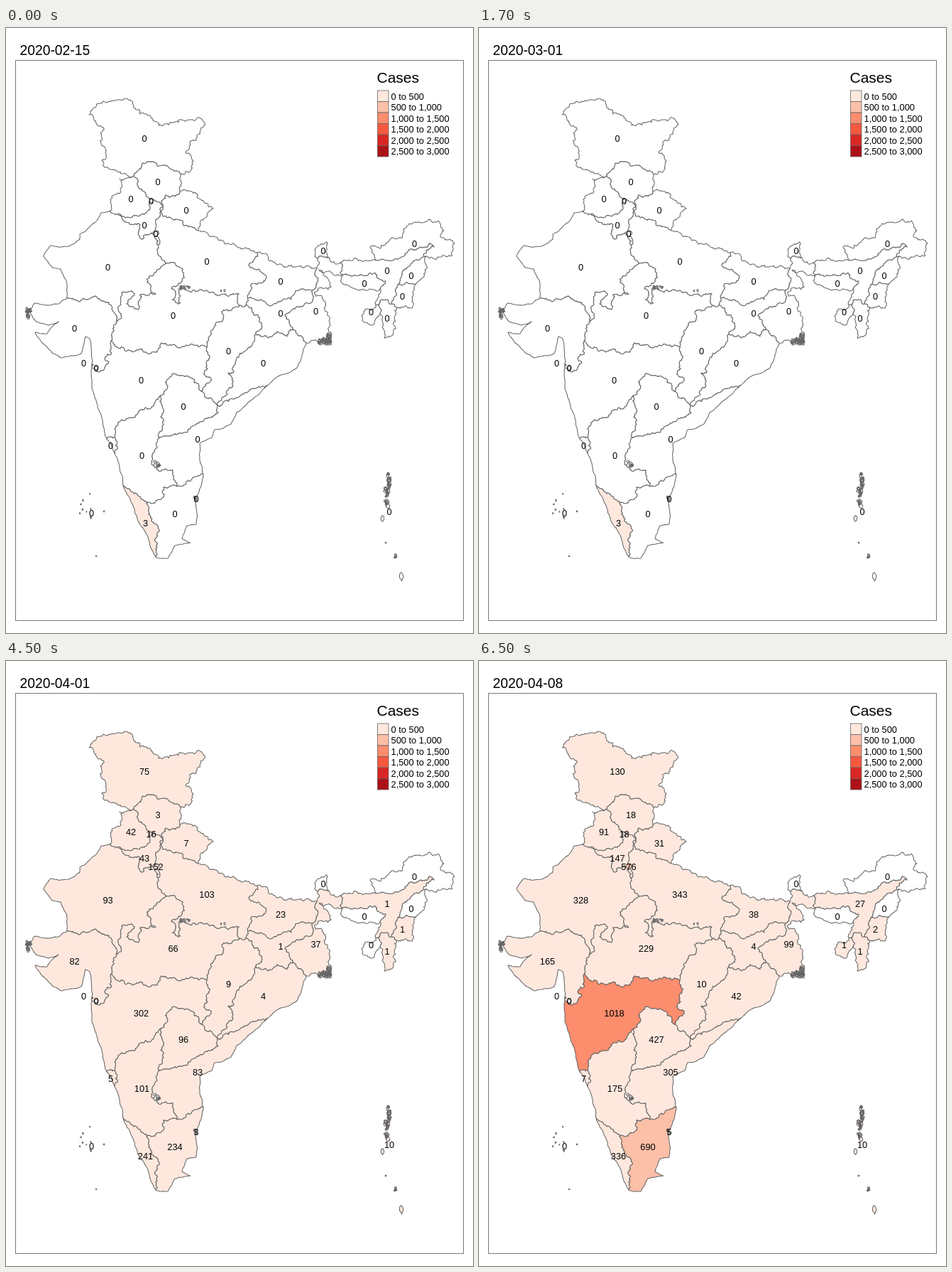
These frames come from a looping animation (658x851 px, 8000 ms). An HTML page:

```html
<!DOCTYPE html>
<html lang="en">
<head>
<meta charset="utf-8">
<title>Cases by state</title>
<style>
html, body { margin: 0; width: 100%; height: 100%; overflow: hidden; background: #fff; }
svg { display: block; width: 658px; height: 851px; font-family: "Liberation Sans", Arial, sans-serif; }
</style>
</head>
<body>
<svg id="stage" viewBox="0 0 658 851"></svg>
<script>
const stage = document.getElementById("stage");
const LINE = "#666";
const SHADES = ["#fee8de", "#fcbfa8", "#fc8d6d", "#f7593f", "#da2723", "#ac1117"];
const STEPS = [[0, "2020-02-15"], [500, "2020-03-01"], [2500, "2020-03-15"], [4500, "2020-04-01"], [6500, "2020-04-08"]];
const LOOP = 8000;

function add(tag, attrs) {
  const el = document.createElementNS("http://www.w3.org/2000/svg", tag);
  for (const k in attrs) el.setAttribute(k, attrs[k]);
  return stage.appendChild(el);
}
function label(x, y, size, text, anchor = "start") {
  const el = add("text", { x, y, "font-size": size, "text-anchor": anchor });
  el.textContent = text;
  return el;
}
const drawLine = (d, width = 1.05) =>
  add("path", { d, fill: "#fff", stroke: LINE, "stroke-width": width, "stroke-linejoin": "round" });

function random(seed) {
  return () => {
    seed = (seed + 0x6d2b79f5) | 0;
    let v = Math.imul(seed ^ (seed >>> 15), 1 | seed);
    v = (v + Math.imul(v ^ (v >>> 7), 61 | v)) ^ v;
    return ((v ^ (v >>> 14)) >>> 0) / 4294967296;
  };
}
const trace = pts => "M" + pts.map(p => p.map(v => v.toFixed(1)).join(" ")).join("L");
const gap = (a, b) => Math.hypot(a[0] - b[0], a[1] - b[1]);

// Splits each step at a shifted midpoint, again and again, for a ragged line.
function roughen(pts, amp) {
  const rnd = random(pts[0][0] * 977 + pts[0][1] * 31 + pts.length);
  const split = (a, b) => {
    const d = gap(a, b);
    if (d < 2.8) return [b];
    const k = (rnd() - 0.5) * 2 * Math.min(amp, 3 / d);
    const m = [(a[0] + b[0]) / 2 - (b[1] - a[1]) * k, (a[1] + b[1]) / 2 + (b[0] - a[0]) * k];
    return [...split(a, m), ...split(m, b)];
  };
  return pts.reduce((out, p, i) => i ? out.concat(split(pts[i - 1], p)) : [p], []);
}

// Key points of shared borders; "~" marks a smooth one.
const BORDERS = {
  jkOut: "180 208 155 200 141 196 135 186 141 181 134 163 133 148 138 143 117 122 126 112 158 101 175 101 189 121 204 124 215 137 243 133 244 129 277 130 268 158 259 160 253 175 264 187 261 200 246 206",
  jkHp: "180 208 193 190 205 188 213 194 226 193 246 206",
  hpOut: "246 206 247 219 245 231",
  hpUk: "245 231 225 235 221 250",
  hpHar: "221 250 205 243",
  punHp: "180 208 188 226 205 243",
  punOut: "180 208 160 212 163 224 147 241 145 258",
  punRaj: "145 258 158 262",
  punHar: "158 262 178 266 199 258 205 243",
  ukOut: "245 231 253 228 272 240 292 254 271 285",
  ukUp: "221 250 221 265 240 269 258 279 271 285",
  harUp: "221 250 211 272 214 305",
  harRaj: "158 262 177 276 186 275 193 297 205 288 214 305",
  rajOut: "~145 258 134 260 127 272 104 290 104 297 88 307 63 306 53 321 65 337 77 339 85 355 86 380",
  rajUp: "214 305 217 321 232 330",
  rajGuj: "86 380 127 378 146 389 155 413",
  rajMp: "155 413 162 409 163 373 181 374 170 388 186 396 189 375 211 374 199 358 202 349 232 330",
  upMp: "232 330 249 339 250 347 233 367 239 371 234 382 246 387 245 365 285 371 328 374 328 392",
  upCh: "328 392 341 391",
  upJh: "341 391 341 380",
  upBih: "341 380 345 363 362 358 367 349 343 331 354 316",
  upOut: "271 285 305 299 333 311 354 316",
  bihOut: "354 316 385 332 438 338",
  bihWb: "438 338 437 350 432 369",
  bihJh: "341 380 370 390 402 382 413 369 432 369",
  jhCh: "341 391 355 404 361 420 352 430",
  jhOd: "352 430 375 434 382 427 396 434 405 424",
  jhWb: "405 424 393 405 417 392 432 383 432 369",
  wbOd: "405 424 423 443",
  wbOut: "423 443 438 440 458 446 457 418 453 402 446 381 436 377 440 366 458 364 441 340 474 347",
  wbAs: "474 347 471 330",
  wbNep: "438 338 439 325",
  wbSik: "439 325 455 323",
  wbBhu: "455 323 471 330",
  sikOut: "439 325 438 308 452 301 455 323",
  asBhu: "471 330 521 327",
  arOut: "521 327 513 308 526 310 559 290 567 277 609 271 617 285 612 293 632 303 629 320 592 321",
  asAr: "521 327 556 323 596 303 603 308 583 325",
  arNa: "583 325 592 321",
  naOut: "592 321 590 340 577 360",
  asNa: "583 325 565 337 552 361",
  naMn: "552 361 577 360",
  mnOut: "577 360 572 394 550 393",
  asMn: "552 361 543 388",
  mnMz: "543 388 550 393",
  asMz: "526 388 531 382 543 388",
  mzOut: "550 393 545 432 533 436 527 402",
  mzTr: "526 388 527 402",
  trAs: "521 389 526 388",
  trOut: "527 402 514 418 502 407 504 399 518 395 521 389",
  asMe: "474 347 518 345 535 356 527 367",
  meOut: "474 347 475 360 510 369 527 367",
  asBd: "527 367 521 389",
  gujOut: "~86 380 74 388 40 387 34 400 42 413 60 418 74 413 58 430 41 428 56 447 78 464 106 458 112 434 118 437 122 468 121 478",
  gujMp: "155 413 149 439",
  gujMh: "149 439 148 459 140 463 145 470 133 482 121 478",
  mpMh: "149 439 156 449 178 456 213 456 219 443 283 449",
  mpCh: "283 449 285 436 306 408 304 399 328 392",
  mhCh: "283 449 280 488 289 494 275 511",
  mhTe: "275 511 263 493 236 486 218 517",
  mhKa: "218 517 203 536 190 537 181 548 155 560 153 576",
  mhGoa: "142 578 153 576",
  mhOut: "~121 478 120 488 128 528 142 578",
  goaOut: "~142 578 153 598",
  goaKa: "153 576 153 598",
  chOd: "352 430 344 449 328 463 320 485 313 485 318 506 298 531",
  chTe: "275 511 298 531",
  teAp: "298 531 299 541 255 569 217 576",
  teKa: "218 517 218 547 217 576",
  odAp: "298 531 337 513 368 503",
  odOut: "~423 443 417 460 410 478 380 492 368 503",
  apOut: "~368 503 325 541 317 557 294 565 290 576 273 584 278 628",
  apTn: "278 628 241 645",
  apKa: "217 576 206 600 209 617 235 622 241 645",
  kaTn: "241 645 222 646 222 660 198 669",
  kaKe: "165 643 180 655 198 669",
  kaOut: "~153 598 165 643",
  keOut: "~165 643 187 695 211 744",
  keTn: "198 669 201 684 214 700 211 744",
  tnOut: "~278 628 267 668 268 698 255 700 248 718 260 724 238 728 228 746 211 744"
};
const lines = {};
for (const name in BORDERS) {
  const pairs = BORDERS[name].match(/\d+ \d+/g).map(p => p.split(" ").map(Number));
  lines[name] = roughen(pairs, BORDERS[name][0] === "~" ? 0.08 : 0.32);
}

function ring(names) {
  return trace(names.split(" ").reduce((out, name) => {
    const next = lines[name], end = out[out.length - 1];
    if (!end) return next;
    return out.concat(gap(end, next[0]) < 1 ? next : [...next].reverse());
  }, [])) + "Z";
}
function blob(x, y, rx, ry) {
  const rnd = random(x * 53 + y);
  return trace(Array.from({ length: 9 }, (_, i) => {
    const a = i / 9 * Math.PI * 2, r = 0.7 + rnd() * 0.5;
    return [x + Math.cos(a) * rx * r, y + Math.sin(a) * ry * r];
  })) + "Z";
}
// Scatters n small islets of about the given size over a box.
function islets(x, y, w, h, n, size) {
  const rnd = random(x + y);
  return Array.from({ length: n }, () =>
    blob(x + rnd() * w, y + rnd() * h, size * (0.5 + rnd()), size * (0.7 + rnd() * 1.5))).join("");
}

// Label place, counts in time order, outline.
const states = [];
function state(place, counts, outline) {
  const [x, y] = place.split(" ").map(Number);
  const d = outline[0] === "M" ? outline : ring(outline);
  states.push({ x, y, counts: counts.split(" ").map(Number), shape: drawLine(d) });
}
add("rect", { width: 658, height: 851, fill: "#fff" });
state("195 155.5", "0 5 75 130", "jkOut jkHp");
state("214 216", "0 0 3 18", "jkHp hpOut hpUk hpHar punHp");
state("176 240.5", "0 1 42 91", "punOut punRaj punHar punHp");
state("254 256", "0 1 7 31", "ukOut ukUp hpUk");
state("195 277", "0 14 43 147", "hpHar punHar harRaj harUp");
state("143.5 336", "0 4 93 328", "rajOut rajGuj rajMp rajUp harRaj punRaj");
state("283 328", "0 13 103 343", "upOut upBih upJh upCh upMp rajUp harUp ukUp");
state("387 356", "0 0 23 38", "bihOut bihWb bihJh upBih");
state("447 313.5", "0 0 0 0", "sikOut wbSik");
state("575.5 303.5", "0 0 0 0", "arOut arNa asAr");
state("571 348", "0 0 0 0", "naOut naMn asNa arNa");
state("558.5 377", "0 0 1 2", "mnOut mnMz asMn naMn");
state("537 408.5", "0 0 1 1", "mzOut mzTr asMz mnMz");
state("514.5 399.5", "0 0 0 1", "trOut trAs mzTr");
state("505 359", "0 0 0 0", "asMe meOut");
state("537 341", "0 0 1 27", "asBhu asAr asNa asMn asMz trAs asBd asMe wbAs");
state("436.5 398", "0 0 37 99", "wbOut wbAs wbBhu wbSik wbNep bihWb jhWb wbOd");
state("387 401", "0 0 1 4", "bihJh jhWb jhOd jhCh upJh");
state("362.5 471.5", "0 0 4 42", "jhOd wbOd odOut odAp chOd");
state("313.5 454.5", "0 0 9 10", "upCh jhCh chOd chTe mhCh mpCh");
state("235.5 404", "0 0 66 229", "rajMp upMp mpCh mpMh gujMp");
state("96.5 422.5", "0 0 82 165", "gujOut gujMh gujMp rajGuj");
state("190.5 495.5", "0 32 302 1018", "mpMh mhCh mhTe mhKa mhGoa mhOut gujMh");
state("250 532", "0 3 96 427", "chTe teAp teKa mhTe");
state("270 578", "0 1 83 305", "odAp apOut apTn apKa teAp");
state("191.5 601.5", "0 6 101 175", "mhKa goaKa kaOut kaKe kaTn apKa teKa");
state("147.5 587", "0 0 5 7", "mhGoa goaKa goaOut");
state("196.5 696.5", "3 22 241 336", "keOut keTn kaKe");
state("238 683.5", "0 1 234 690", "tnOut keTn kaTn apTn");
state("204.5 243", "0 0 16 18", blob(205, 243, 2.4, 2.8));
state("211 289.5", "0 7 152 576", blob(211, 289, 4, 4.5));
state("109.5 471.5", "0 0 0 0", blob(122, 474, 0.8, 1.2));
state("127 478.5", "0 0 0 0", blob(127, 478, 3, 3));
state("268 662.5", "0 0 3 5", islets(265, 660, 3, 5, 6, 1));
state("120.5 682", "0 0 0 0", islets(101, 654, 20, 36, 9, 0.7) + blob(138, 680, 0.8, 1) + blob(127, 743, 1, 0.7));
state("540 680", "0 0 10 10", islets(537, 626, 4, 28, 16, 1.8) + islets(534, 648, 5, 30, 18, 1.8) +
  blob(530, 690, 2.3, 4) + blob(535, 724, 1, 1) + islets(543, 741, 8, 9, 5, 1.3) + blob(557, 771, 2.6, 6));

// Creeks and marshes, too dense to show a fill.
drawLine(islets(28, 395, 7, 5, 18, 1.3) + islets(29, 400, 4, 8, 8, 1.2));
drawLine(islets(440, 437, 18, 8, 38, 1.3) + islets(452, 431, 6, 8, 14, 1.3));
drawLine(islets(246, 363, 14, 4, 9, 1) + islets(302, 369, 10, 2, 3, 0.8));
drawLine(blob(213, 614, 4.5, 4.5) + islets(209, 609, 9, 9, 5, 1.2));

for (const s of states) s.label = label(s.x, s.y + 4.5, 12.8, "", "middle");

add("rect", { x: 13.5, y: 45.5, width: 631, height: 788, fill: "none", stroke: "#777" });
const date = label(19.5, 38, 19.3, "");
label(522.5, 77, 21, "Cases");
SHADES.forEach((fill, i) => {
  const y = 88 + i * 15.5, size = 15.5, from = i * 500;
  add("rect", { x: 523.5, y, width: size, height: size, fill, stroke: LINE, "stroke-width": 0.8 });
  label(542.5, y + 12.5, 12.85, [from, from + 500].map(n => n.toLocaleString("en-US")).join(" to "));
});

let shown = -1;
function draw(time) {
  const t = time % LOOP;
  const step = STEPS.filter(s => s[0] <= t).length - 1;
  if (step === shown) return;
  shown = step;
  date.textContent = STEPS[step][1];
  for (const s of states) {
    const n = s.counts[Math.max(0, step - 1)];
    s.label.textContent = n;
    s.shape.setAttribute("fill", n ? SHADES[Math.floor(n / 500)] : "#fff");
  }
}
function tick() {
  draw(performance.now());
  requestAnimationFrame(tick);
}
draw(0);
requestAnimationFrame(tick);
</script>
</body>
</html>
```
